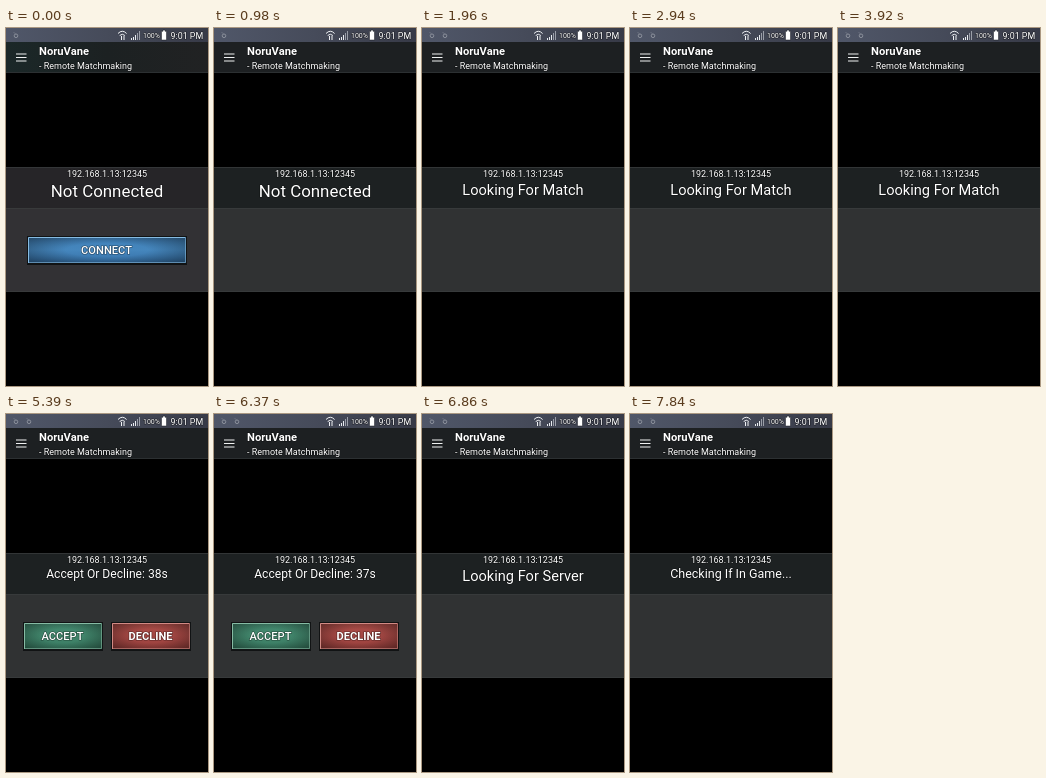
Write an HTML page that moves like this. It is 202 px wide and 358 px high and loops after 8000 ms.

```html
<!DOCTYPE html>
<html lang="en">
<head>
<meta charset="utf-8">
<title>Remote Matchmaking</title>
<style>
  html, body { margin: 0; width: 100%; height: 100%; overflow: hidden; background: #000; }
  svg { display: block; width: 100%; height: 100%; }
  text {
    font-family: Roboto, sans-serif; fill: #fff;
    paint-order: stroke; stroke: #000; stroke-opacity: .45; stroke-width: 1.2px;
  }
  .mid { text-anchor: middle; }
  .label { font-size: 11.1px; font-weight: 500; text-anchor: middle; }
</style>
</head>
<body>
<svg viewBox="0 0 202 358" preserveAspectRatio="none">
  <defs>
    <linearGradient id="top">
      <stop offset="0" stop-color="#505769"/>
      <stop offset=".5" stop-color="#464b5a"/>
      <stop offset="1" stop-color="#373a47"/>
    </linearGradient>
    <linearGradient id="warmBar">
      <stop offset="0" stop-color="#1b2828"/>
      <stop offset=".5" stop-color="#1c2122"/>
      <stop offset="1" stop-color="#212223"/>
    </linearGradient>
    <linearGradient id="blue" x2="0" y2="1">
      <stop offset="0" stop-color="#4080b8"/>
      <stop offset=".5" stop-color="#4586bd"/>
      <stop offset="1" stop-color="#3671a8"/>
    </linearGradient>
    <linearGradient id="green" x2="0" y2="1">
      <stop offset="0" stop-color="#458a70"/>
      <stop offset="1" stop-color="#3b7d64"/>
    </linearGradient>
    <linearGradient id="red" x2="0" y2="1">
      <stop offset="0" stop-color="#ab4d48"/>
      <stop offset="1" stop-color="#9b413e"/>
    </linearGradient>
    <radialGradient id="shade" r=".65">
      <stop offset=".4" stop-color="#000" stop-opacity="0"/>
      <stop offset="1" stop-color="#000" stop-opacity=".4"/>
    </radialGradient>
  </defs>

  <rect width="202" height="358"/>
  <rect id="bar" width="202" height="44"/>
  <rect width="202" height="14" fill="url(#top)"/>
  <path d="M0 44.5h202" stroke="#2c3032"/>

  <g fill="none" stroke="#8b909b">
    <g id="notice"><circle cx="10" cy="7.8" r="1.8"/><path d="M8 4.5l1 1"/></g>
    <use id="second" href="#notice" x="13"/>
  </g>
  <g fill="none" stroke="#f0f2f5">
    <path d="M112 5.5Q116.3 1 120.6 5.5M113.7 7.5Q116.3 5 118.9 7.5"/>
    <path d="M115.5 8v4M118 8v4"/>
  </g>
  <path d="M125.5 12v-2M127.5 12v-3M129.5 12v-5" stroke="#e8ebef"/>
  <path d="M131.5 12v-7M133.5 12v-9" stroke="#9a9ea8"/>
  <text x="137" y="10" font-size="7">100%</text>
  <path d="M155.5 3.3h1.5v-1.3h2v1.3h1.5v8.7h-5z" fill="#fff" stroke="#1b1d24" stroke-width=".5"/>
  <text x="164.5" y="10.6" font-size="8.9">9:01 PM</text>

  <path d="M10 26h10.5M10 29.5h10.5M10 33h10.5" stroke="#f0f2f2"/>
  <text x="33" y="27" font-size="11.2" font-weight="700">NoruVane</text>
  <text x="33" y="40.5" font-size="9">- Remote Matchmaking</text>

  <rect id="strip" y="139" width="202" height="41"/>
  <rect id="panel" y="180" width="202" height="84"/>
  <path d="M0 139.5h202M0 180.5h202M0 263.5h202" stroke="#3b3e3f" stroke-opacity=".7"/>
  <text class="mid" x="101" y="149" font-size="9">192.168.1.13:12345</text>
  <text id="status" class="mid" x="101"></text>
  <g id="connect"></g>
  <g id="choice"></g>
</svg>
<script>
const LOOP = 8000;
const $ = id => document.getElementById(id);

// start ms, status text, font size, baseline, visible buttons
const steps = [
  [0, "Not Connected", 16.9, 169, "connect"],
  [980, "Not Connected", 16.9, 169, ""],
  [1960, "Looking For Match", 14.6, 167, ""],
  [4410, "Accept Or Decline", 15.35, 167.3, "choice"],
  [4900, "Accept Or Decline: 38s", 12.1, 164, "choice"],
  [5880, "Accept Or Decline: 37s", 12.1, 164, "choice"],
  [6860, "Looking For Server", 14.6, 167, ""],
  [7350, "Checking If In Game...", 12.5, 164.3, ""]
];

function button(x, w, paint, edge, label, weight = 500) {
  const box = `x="${x}" y="209" width="${w}" height="26"`;
  const right = x + w - 0.5;
  return `<rect x="${x - 1}" y="208" width="${w + 2}" height="29" fill="#111314"/>
    <rect ${box} fill="url(#${paint})"/>
    <rect ${box} fill="url(#shade)"/>
    <path d="M${x + 0.5} 235V209.5H${right}" fill="none" stroke="${edge}"/>
    <path d="M${x + 1} 234.5H${right}V210" fill="none" stroke="${edge}" stroke-opacity=".6"/>
    <text class="label" x="${x + w / 2 - 0.5}" y="226.3" style="font-weight:${weight}">${label}</text>`;
}

$("connect").innerHTML = button(22, 158, "blue", "#86bbe2", "CONNECT");
$("choice").innerHTML = button(18, 78, "green", "#86bba4", "ACCEPT") +
  button(106, 78, "red", "#d28a84", "DECLINE", 700);

let shown;
function draw(now) {
  const t = now % LOOP;
  const step = steps.findLast(s => s[0] <= t);
  if (step !== shown) {
    shown = step;
    const [start, text, size, y, buttons] = step;
    const warm = start === 0;
    const status = $("status");
    status.textContent = text;
    status.setAttribute("font-size", size);
    status.setAttribute("y", y);
    for (const id of ["connect", "choice"]) $(id).style.display = id === buttons ? "" : "none";
    $("second").style.display = start < 1960 ? "none" : "";
    $("bar").setAttribute("fill", warm ? "url(#warmBar)" : "#1d2022");
    $("strip").setAttribute("fill", warm ? "#262528" : "#1d2122");
    $("panel").setAttribute("fill", warm ? "#323134" : "#303233");
  }
  requestAnimationFrame(() => draw(performance.now()));
}
draw(performance.now());
</script>
</body>
</html>
```
